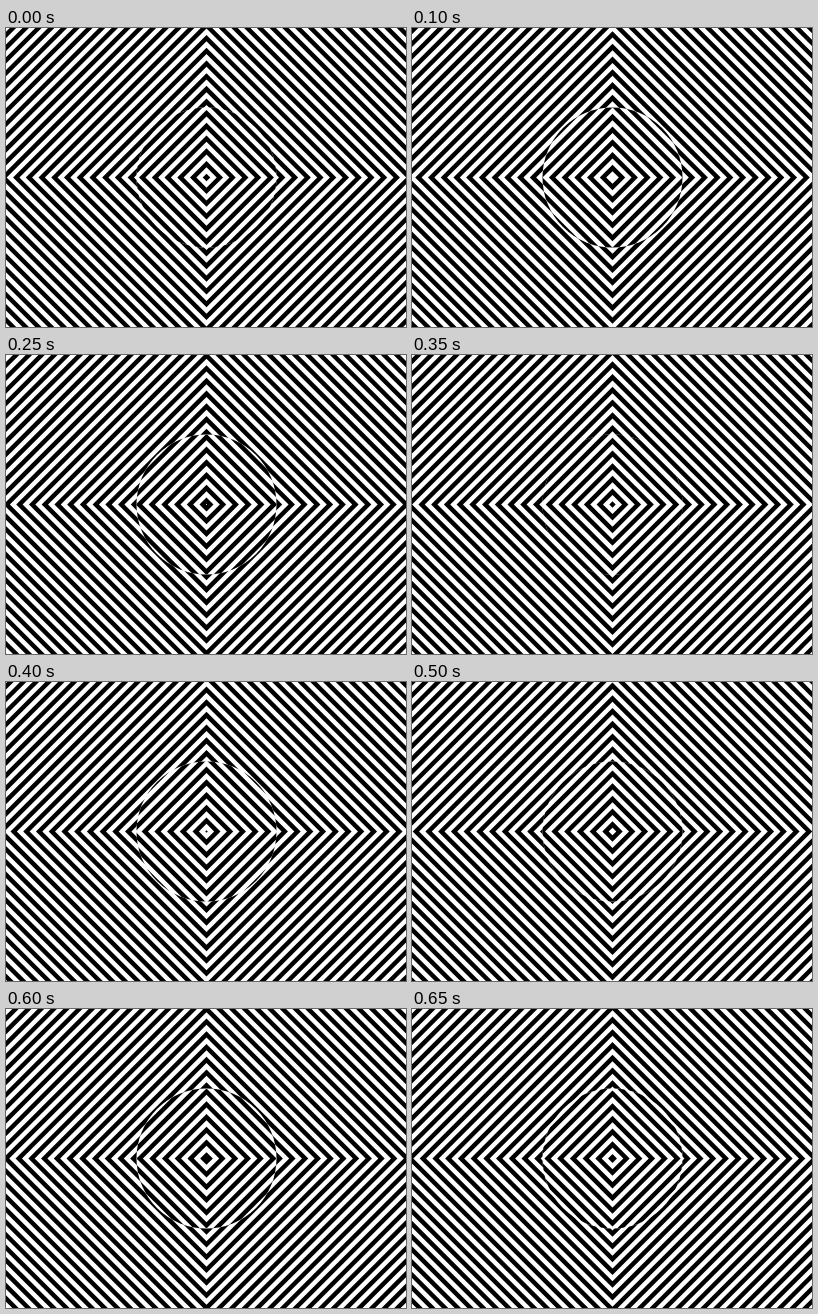
Animation, 400 px wide and 299 px high, one loop 700 ms. Source, as an HTML page with a canvas:

```html
<!DOCTYPE html>
<html>
<head>
<meta charset="utf-8">
<style>
  html, body { margin: 0; width: 100%; height: 100%; overflow: hidden; background: #fff; }
  canvas { display: block; }
</style>
</head>
<body>
<canvas id="stage" width="400" height="299"></canvas>
<script>
const ctx = document.getElementById('stage').getContext('2d');
const WIDTH = 400, HEIGHT = 299, CX = 200.5, CY = 149.5;
const PERIOD = 9 * Math.SQRT2;   // spacing along the axes, 9 px across the stripes
const STEP_MS = 50, STEPS = 14, ALIGNED_STEP = 7;
const CYCLES_PER_STEP = 0.15, DISC_RADIUS = 70;

function diamond(r) {
  if (r <= 0) return;
  ctx.moveTo(CX, CY - r);
  ctx.lineTo(CX + r, CY);
  ctx.lineTo(CX, CY + r);
  ctx.lineTo(CX - r, CY);
  ctx.closePath();
}

// Black bands centred on whole periods, moved outward by a number of cycles.
function bands(cycles) {
  ctx.fillStyle = '#fff';
  ctx.fillRect(0, 0, WIDTH, HEIGHT);
  ctx.fillStyle = '#000';
  ctx.beginPath();
  const phase = cycles - Math.floor(cycles);
  for (let r = (phase - 1.25) * PERIOD; r < 370; r += PERIOD) {
    diamond(r);
    diamond(r + PERIOD / 2);
  }
  ctx.fill('evenodd');
}

function draw(now) {
  const step = Math.floor(now / STEP_MS) % STEPS;
  const cycles = (step - ALIGNED_STEP) * CYCLES_PER_STEP;
  bands(cycles);
  ctx.save();
  ctx.beginPath();
  ctx.arc(CX, CY, DISC_RADIUS, 0, Math.PI * 2);
  ctx.clip();
  bands(-cycles);
  ctx.restore();
}

const start = performance.now();
function tick() {
  draw(performance.now() - start);
  requestAnimationFrame(tick);
}
tick();
</script>
</body>
</html>
```
